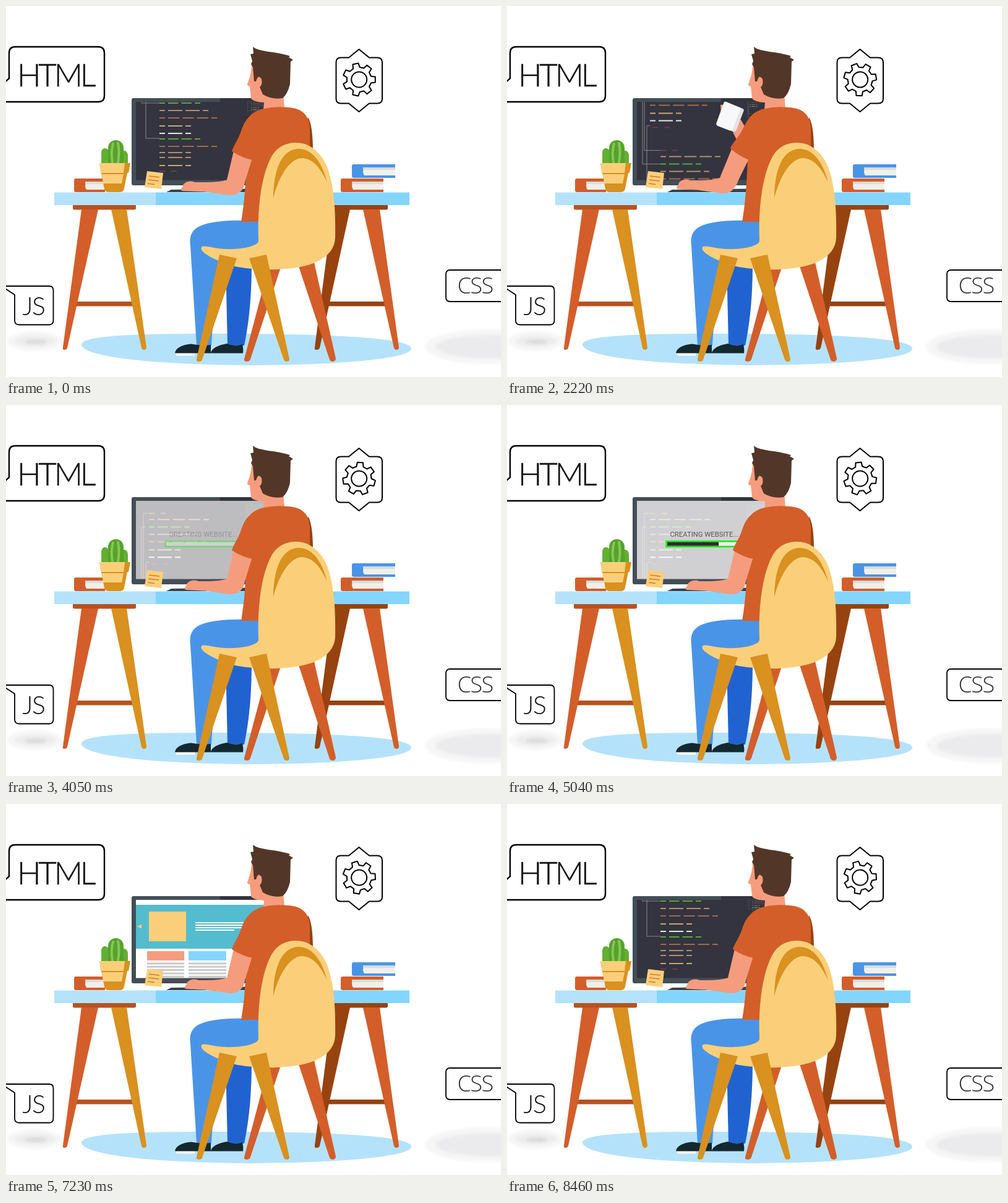
An HTML page for the animation above (8530 ms loop, 800 by 600 pixels).

```html
<!DOCTYPE html>
<html lang="en">
<head>
<meta charset="utf-8">
<title>Creating a website</title>
<style>
  html, body { margin: 0; width: 100%; height: 100%; overflow: hidden; background: #fff; }
  svg { display: block; width: 800px; height: 600px; }
  .line { fill: none; stroke: #000; stroke-linejoin: round; }
  .orange { fill: #d35e2a; }
  .gold { fill: #d9911f; }
  .cream { fill: #fbcf7a; }
  .dark { fill: #974310; }
  .skin { fill: #f69c7e; }
  .label { font-family: Lato, "Open Sans", sans-serif; font-weight: 300; fill: #111; }
</style>
</head>
<body>
<svg viewBox="0 0 800 600" xmlns="http://www.w3.org/2000/svg">
  <defs>
    <clipPath id="screen"><path d="M210 155H425V281.500H210Z"/></clipPath>
    <clipPath id="mini"><path d="M383 155H425V181H383Z"/></clipPath>
    <filter id="soft" x="-20%" y="-50%" width="140%" height="200%"><feGaussianBlur stdDeviation="2"/></filter>
  </defs>

  <!-- floor -->
  <g filter="url(#soft)">
    <ellipse cx="46" cy="542" rx="44" ry="16" fill="#f6f6f6"/>
    <ellipse cx="47" cy="542" rx="33" ry="9" fill="#ededed"/>
    <ellipse cx="48" cy="543" rx="18" ry="4" fill="#dcdcdc"/>
    <ellipse cx="775" cy="551" rx="98" ry="28" fill="#f6f6f7"/>
    <ellipse cx="784" cy="551" rx="90" ry="19" fill="#ebebed"/>
  </g>
  <path fill="#b5e2fb" d="M122 547C125 531 235 530 345 530 470 530 655 533 655 554 655 572 520 581 390 581 250 580 122 569 122 547Z"/>

  <!-- badges -->
  <path class="line" stroke-width="2.400" d="M-5 155H149Q159 155 159 145V76Q159 66 149 66H15Q5 66 5 76V117L-5 126"/>
  <text class="label" x="18" y="129.500" font-size="51" letter-spacing="-4.200" stroke="#111" stroke-width=".4">HTML</text>
  <path class="line" stroke-width="1.800" d="M-5 453H70Q76.500 453 76.500 460V508Q76.500 515.500 70 515.500H21Q14 515.500 14 508V467L-3 456"/>
  <text class="label" x="26.500" y="499.500" font-size="41" letter-spacing="-1.500">JS</text>
  <rect class="line" stroke="#222" stroke-width="1.800" x="711" y="427" width="110" height="51" rx="6"/>
  <text class="label" x="729.500" y="465" font-size="36" letter-spacing="-1.500" style="font-family:'Open Sans',sans-serif;fill:#333">CSS</text>
  <path class="line" stroke-width="2" d="M541 83.500H554L570.500 70 587 83.500H600Q608 83.500 608 91V150Q608 157.500 600 157.500H587L570.500 171 554 157.500H541Q533.500 157.500 533.500 150V91Q533.500 83.500 541 83.500Z"/>
  <g id="gear" class="line" stroke-width="2"><path id="cog"/><circle r="12.500"/></g>

  <!-- desk -->
  <path class="dark" d="M505 322H617V327Q617 329.500 614 329.500H505ZM528 329H556L507 553Q506 556 502 556 498 556 499 552ZM516 478H612V485.500H514Z"/>
  <path class="orange" d="M577 329H604L635 552Q635 556 631 556 628 556 627 553Z"/>
  <path fill="#b7521f" d="M108 322H210V327Q210 329.500 207 329.500H111Q108 329.500 108 327ZM114 478H206V485.500H112Z"/>
  <path class="orange" d="M122 329H149L99 553Q98 556 94 556 91 556 92 552Z"/>
  <path class="gold" d="M170 329H195L227 552Q227 556 223 556 220 556 219 553Z"/>
  <path fill="#b5e2fb" d="M78 301.500H243V322H78Z"/>
  <path fill="#84d5fe" d="M242 301.500H652V322H242Z"/>

  <!-- books -->
  <g id="books"></g>

  <!-- plant -->
  <path fill="#62b031" d="M154 256V238C154 227 166 228 167 238V256ZM185 256V241C186 231 197 232 197 242V256Z"/>
  <path fill="#55a329" d="M165 256V229C166 213 189 213 190 229V256Z"/>
  <path fill="none" stroke="#86c55a" stroke-width="4" stroke-linecap="round" d="M173 223Q169 236 172 253M181 222Q184 236 181 253"/>
  <path class="gold" d="M151 254H201L198 270H196L191 295Q190 301 184 301H166Q160 301 159 296L154 270Z"/>
  <path class="cream" d="M151 254H192L190 270H153ZM155 272H190L187 287H157Z"/>

  <!-- monitor -->
  <rect x="203" y="149" width="222" height="141" rx="3" fill="#434e56"/>
  <path fill="#33343f" d="M346 149H420V155H346Z"/>
  <path fill="#33343f" d="M210 155H425V281.500H210Z"/>
  <g clip-path="url(#screen)">
    <g id="code"></g>
    <g clip-path="url(#mini)"><g id="map"></g></g>
    <path id="veil" fill="#fff" d="M210 155H425V282H210Z"/>
    <g id="load">
      <text x="263.500" y="212.500" font-size="11.300" font-family="Roboto, Arial, sans-serif" fill="#555">CREATING WEBSITE...</text>
      <rect x="257.500" y="220.500" width="160" height="8.500" fill="#eee" stroke="#0cf00c" stroke-width="2.500"/>
      <rect id="bar" x="259" y="221.700" height="6" fill="#2d2d2d"/>
    </g>
    <g id="site">
      <path fill="#fff" d="M210 155H425V282H210Z"/>
      <g id="page">
        <path fill="#53bccf" d="M210 163H425V234H210Z"/>
        <path class="cream" d="M231 174H291V222H231ZM212 198L219 194.500V201.500Z"/>
        <path stroke="#fff" stroke-width="2" d="M306 192H384M306 196H384M306 200H384M306 204H369"/>
        <path class="skin" d="M228 238H288V253H228Z"/>
        <path fill="#84d5fe" d="M295 238H356V253H295Z"/>
        <g id="copy" stroke="#cacaca" stroke-width="3"></g>
      </g>
    </g>
  </g>
  <path fill="#39434b" d="M259 301L267 297 390 295.500V301Z"/>
  <path class="cream" d="M228 267L254 270 251 296 224 293Z"/>
  <path stroke="#d9772f" stroke-width="1.500" d="M231 275L248 277M230 281L247 283M229 287L240 288.500"/>

  <!-- far arm with cup -->
  <g id="cup">
    <path class="skin" d="M345 160Q349 158 352 164L356 178 346 174ZM361 190L378 184 410 240 390 255 366 206Z"/>
    <path fill="#e2e4e9" d="M354 155L381 166Q384 168 382 171L371 200Q369 204 365 203L341 194Q337 192 339 188L350 158Q351 154 354 155Z"/>
    <path fill="#f8f8fa" d="M354 155L378 165 365 199Q363 202 359 201L341 194Q337 192 339 188L350 158Q351 154 354 155Z"/>
  </g>

  <!-- legs -->
  <path fill="#2063d0" d="M355 415H397C397 470 393 510 385 549H358Z"/>
  <path fill="#4a94e8" d="M412 349C380 345 335 346 313 356 299 363 296 374 298 388L308 549H332C334 500 346 430 356 415L412 400Z"/>
  <path fill="#fff" d="M273 561H305V565.500H276Z"/>
  <path fill="#14282f" d="M273 561.500C274 553 284 548 299 546.500Q318 550 331 548V561.500ZM331 561.500C332 553 345 548 357 546Q372 552 382 547 384 555 383 561.500Z"/>

  <!-- body -->
  <path class="dark" d="M488 180Q496 192 496 235L485 245Z"/>
  <path class="skin" d="M397 96C396 110 394 116 390 126Q389 129 394 130L396 149Q399 155 417 156L416 167Q434 174 450 166L448 140 420 100Z"/>
  <path class="orange" d="M417 166Q434 162 455 164C480 165 491 178 491 200V349H380C386 315 388 275 389 245L380 205C386 184 398 169 417 166Z"/>
  <path fill="#523729" d="M399 66C410 75 436 73 459 81L457 83 464 87 460 90 459 126Q455 143 447 149 430 152 415 143L410 131 413 118 408 114 404 122H401L399 99 396 94 398 89 395 78 400 77Z"/>
  <ellipse class="skin" cx="409" cy="123" rx="4.500" ry="8"/>

  <!-- near arm -->
  <path id="fore" class="skin"/>
  <g id="upper">
    <path class="skin" d="M369 230L398 246 386 285C384 300 374 306 362 304L357 281Z"/>
    <path class="orange" d="M420 167C396 170 386 184 380 202 376 215 368 225 365 235Q380 245 398 249L412 215Z"/>
  </g>

  <!-- chair -->
  <path class="orange" d="M425 420H445L395 571Q394 575 389 575 384 575 385 571ZM471 415L497 410 533 570Q533 574 529 575 524 575 523 572Z"/>
  <path class="cream" d="M408 379C406 320 414 270 430 242 440 226 455 221 469 221 490 221 508 235 519 260 530 290 533 330 532 375 531 400 508 416 475 422 440 429 378 428 348 414 325 404 313 396 316 390 318 387 325 389 331 390 352 395 385 394 400 387 407 384 408 382 408 379Z"/>
  <path class="gold" d="M432 311C432 270 443 231 474 231 497 232 511 255 519 285 508 262 497 247 478 246 455 247 438 285 432 311Z"/>
  <path class="gold" d="M345 402L373 408 317 572Q316 575 312 575 307 575 308 571ZM393 408L421 402 458 571Q458 575 454 575 450 575 449 572Z"/>
</svg>

<script>
const LOOP = 8530, STEP = 30;
const $ = id => document.getElementById(id);

function add(parent, tag, attrs) {
  const el = document.createElementNS("http://www.w3.org/2000/svg", tag);
  for (const k in attrs) el.setAttribute(k, attrs[k]);
  parent.append(el);
  return el;
}

// Code rows: x, y, width, colour
const ink = { tan: "#b48c6e", gold: "#c7a873", white: "#e8e8e2", green: "#5ba637", brown: "#a3694c", plum: "#713650" };
const rows = [
  [231, 16, 28, "brown"], [231, 26, 97, "tan"], [231, 38, 66, "green"], [231, 50, 79, "tan"],
  [231, 62, 93, "brown"], [231, 75, 51, "gold"], [231, 87, 51, "white"], [235, 98, 28, "plum"],
  [248, 135, 28, "plum"], [248, 145, 97, "tan"], [248, 157, 66, "green"], [248, 169, 79, "tan"],
  [248, 181, 93, "brown"], [248, 194, 51, "gold"], [248, 206, 51, "white"], [248, 215, 66, "green"],
  [248, 227, 93, "brown"], [248, 237, 51, "tan"], [248, 245, 51, "tan"], [248, 258, 51, "gold"],
  [248, 267, 28, "plum"]
];

// One row is a short dash, n even middle dashes and a short dash
function dashes(w) {
  const n = Math.round((w - 23) / 23);
  const mid = n ? (w - 18 - 5 * (n + 1)) / n : 0;
  return n ? [9, ...Array(n).fill([5, mid]).flat(), 5, 9, 99].join(" ") : `9 ${w - 18} 9 99`;
}

function drawCode(g) {
  for (const [x, y, w, c] of rows)
    add(g, "path", { d: `M${x} ${y}h${w}`, stroke: ink[c], "stroke-width": 2, "stroke-dasharray": dashes(w) });
  for (const [x, y] of [[219, 38], [222, 16], [226, 95]])
    add(g, "path", { d: `M${Math.min(x + 7, 231)} ${y}H${x}v119H248`, fill: "none", stroke: "#858690", "stroke-width": 1 });
}
drawCode($("code"));
drawCode($("map"));

function book(x, y, w, color) {
  const g = $("books");
  add(g, "path", { d: `M${x + 3} ${y}h${w - 3}v22h${3 - w}q-3 0 -3 -3v-16q0 -3 3 -3Z`, fill: color });
  add(g, "path", { d: `M${x + 20} ${y + 5}h${w - 20}v13h${20 - w}q-4 -6 0 -13Z`, fill: "#f1efe9" });
  add(g, "path", { d: `M${x + 18} ${y + 5}h${w - 18}v4h${18 - w}Z`, fill: "#d5dedc" });
}
book(110, 279, 50, "#d35e2a");
book(541, 279, 69, "#d35e2a");
book(559, 256, 70, "#4a94e8");

for (let y = 258; y < 310; y += 5.3)
  add($("copy"), "path", { d: `M228 ${y}h60M295 ${y}h61` });

// Gear outline: root, two tooth corners, root
const TEETH = 7, corners = [];
for (let i = 0; i < TEETH; i++)
  for (const [off, r] of [[-16, 20], [-10, 26.5], [10, 26.5], [16, 20]]) {
    const a = (i * 360 / TEETH + off) * Math.PI / 180;
    corners.push((r * Math.cos(a)).toFixed(2) + " " + (r * Math.sin(a)).toFixed(2));
  }
$("cog").setAttribute("d", "M" + corners.join("L") + "Z");

// Piecewise value over time; ease shapes each stretch
const smooth = p => p * p * (3 - 2 * p);
const linear = p => p;
function at(t, keys, ease = smooth) {
  if (t <= keys[0][0]) return keys[0][1];
  for (let i = 1; i < keys.length; i++) {
    const [t0, a] = keys[i - 1], [t1, b] = keys[i];
    if (t < t1) return a + (b - a) * ease((t - t0) / (t1 - t0));
  }
  return keys[keys.length - 1][1];
}

const set = (id, name, value) => $(id).setAttribute(name, value);
const CODE_END = 3585, TYPE_END = 3750;

function draw(t) {
  set("gear", "transform", `translate(570.700 119) rotate(${360 * t / LOOP})`);

  const scroll = t < 6500 ? Math.min(t, CODE_END) * 0.0444 : 0;
  set("code", "transform", `translate(0 ${scroll})`);
  set("map", "transform", `translate(334 ${116 + scroll / 4}) scale(.25)`);

  // Progress panel, then the finished page
  set("veil", "opacity", at(t, [[3700, 0], [4150, 0.77], [6200, 0.77], [6300, 0]]));
  set("load", "opacity", at(t, [[3900, 0], [4250, 1], [5260, 1], [5500, 0]]));
  set("bar", "width", at(t, [[4310, 0], [5040, 83], [5260, 108]], linear));
  set("site", "opacity", at(t, [[5280, 0], [5700, 1], [7860, 1], [8250, 0]]));
  set("page", "transform", `translate(0 ${at(t, [[5900, 12], [7230, 0], [7830, -5]], linear)})`);

  // Typing hand and the sip
  const h = t < TYPE_END ? 3 + 3 * Math.cos(2 * Math.PI * t / 300) : 0;
  const lean = at(t, [[1760, 0], [2130, 1], [2520, 1], [2900, 0]]);
  const x = 289 - h;
  set("fore", "d", `M386 283C384 300 375 307 360 306L322 300.500 ${x + 2} 299Q${x - 3} 297 ${x + 2} 293L${x + 4} 288Q${x + 12} 281 ${x + 22} 285L325 285Q345 285 358 281L366 262Z`);
  set("fore", "transform", `translate(${-14 * lean} ${-3 * lean})`);
  set("upper", "transform", `rotate(${9 * lean} 395 205)`);
  set("cup", "transform", `translate(${70 * (1 - lean)} ${85 * (1 - lean)})`);
}

function tick() {
  const t = performance.now() % LOOP;
  draw(Math.min(Math.floor(t / STEP) * STEP, 8460));
  requestAnimationFrame(tick);
}
tick();
</script>
</body>
</html>
```
